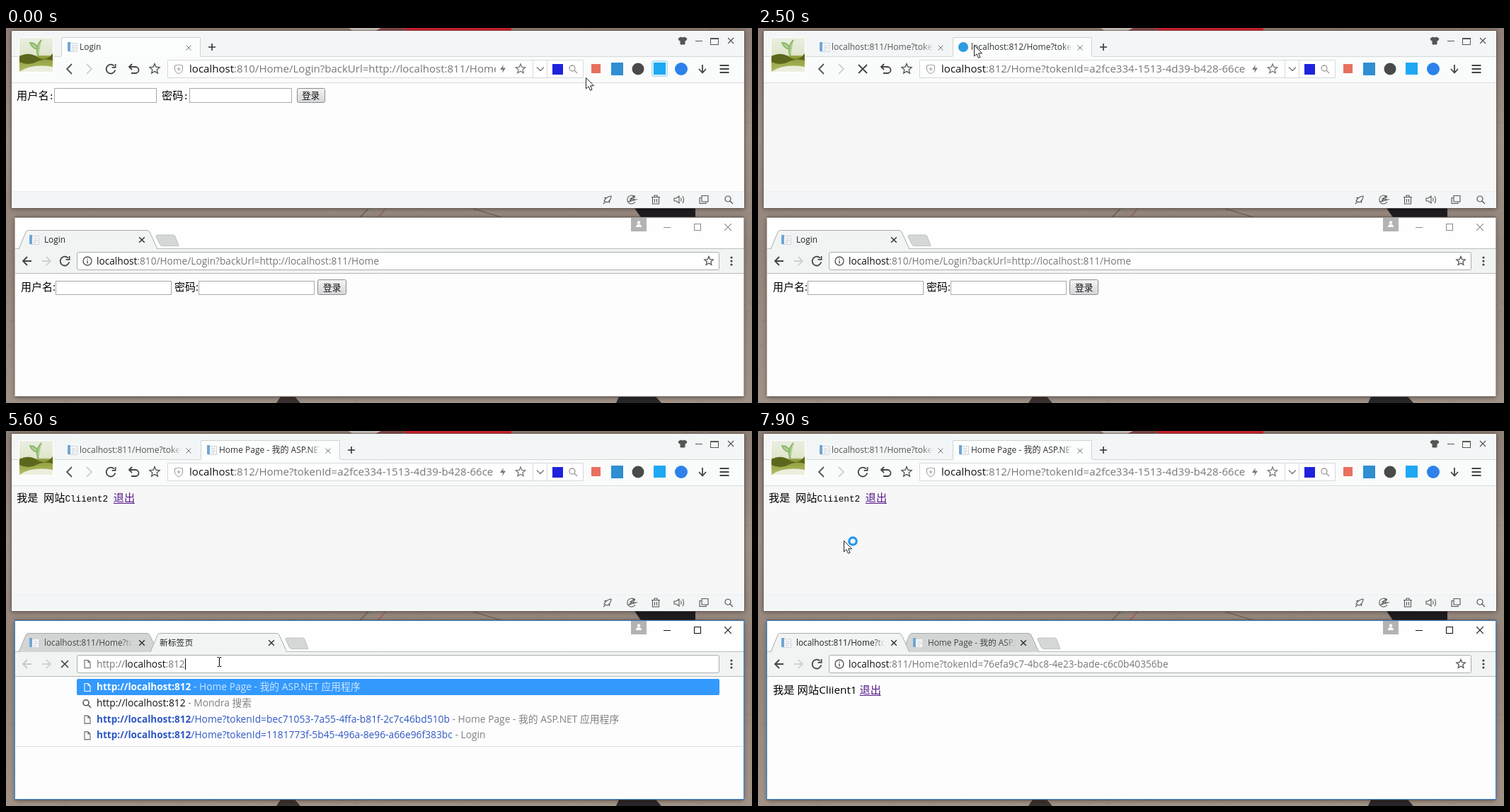
These frames come from a looping animation (1054x531 px, 8 s). An HTML page with a canvas:

```html
<!DOCTYPE html>
<html lang="zh-CN">
<head>
<meta charset="utf-8">
<title>Two browsers</title>
<style>
html, body { margin: 0; width: 100%; height: 100%; overflow: hidden; background: #998a80; }
canvas { display: block; width: 1054px; height: 531px; }
</style>
</head>
<body>
<canvas id="stage" width="1054" height="531"></canvas>
<script>
const ctx = document.getElementById('stage').getContext('2d');
const LOOP = 8000, STEP = 100;
const SANS = '"Open Sans", "Noto Sans CJK SC", "Noto Sans CJK JP", sans-serif';
const MONO = '"Liberation Mono", "Noto Sans CJK SC", monospace';
const TOKEN_A = '/Home?tokenId=a2fce334-1513-4d39-b428-66ce';
const TOKEN_B = '/Home?tokenId=76efa9c7-4bc8-4e23-bade-c6c0b40356be';
const LOGIN_PATH = '/Home/Login?backUrl=http://localhost:811/Home';
const HOME = 'Home Page - 我的 ASP.NET';
const BAR = '#f3f6f6', LINK = '#551a8b';

// ---------- helpers ----------
function rect(x, y, w, h, fill, stroke) {
  if (fill) { ctx.fillStyle = fill; ctx.fillRect(x, y, w, h); }
  if (stroke) { ctx.strokeStyle = stroke; ctx.lineWidth = 1; ctx.strokeRect(x + .5, y + .5, w - 1, h - 1); }
}
function round(x, y, w, h, r, fill, stroke) {
  const inset = stroke ? .5 : 0;
  ctx.beginPath();
  ctx.roundRect(x + inset, y + inset, w - 2 * inset, h - 2 * inset, r);
  if (fill) { ctx.fillStyle = fill; ctx.fill(); }
  if (stroke) { ctx.strokeStyle = stroke; ctx.lineWidth = 1; ctx.stroke(); }
}
function circle(x, y, r, fill) {
  ctx.beginPath(); ctx.arc(x, y, r, 0, 7); ctx.fillStyle = fill; ctx.fill();
}
function path(d, x, y, stroke, width = 1, fill) {
  const p = new Path2D(d);
  ctx.save();
  ctx.translate(x, y);
  if (fill) { ctx.fillStyle = fill; ctx.fill(p); }
  if (stroke) { ctx.strokeStyle = stroke; ctx.lineWidth = width; ctx.stroke(p); }
  ctx.restore();
}
function text(s, x, y, size, color, weight = 400) {
  ctx.font = `${weight} ${size}px ${SANS}`;
  ctx.fillStyle = color;
  ctx.fillText(s, x, y);
  return x + ctx.measureText(s).width;
}
function runs(parts, x, y, size) {
  for (const [s, color, weight] of parts) x = text(s, x, y, weight ? size * .985 : size, color, weight);
  return x;
}
function clipped(x, y, w, h, draw) {
  ctx.save();
  ctx.beginPath(); ctx.rect(x, y, w, h); ctx.clip();
  draw();
  ctx.restore();
}
function fadeText(s, x, y, w, size, color, bg) {
  clipped(x, y - 16, w, 24, () => text(s, x, y, size, color));
  const g = ctx.createLinearGradient(x + w - 16, 0, x + w, 0);
  g.addColorStop(0, bg + '00');
  g.addColorStop(1, bg);
  rect(x + w - 16, y - 12, 17, 16, g);
}
// full-width glyphs with half-width Latin
function songText(s, x, y, color = '#000') {
  const em = 15.2;
  for (const part of s.match(/[\x00-\x7f]+|[^\x00-\x7f]+/g)) {
    const latin = part.charCodeAt(0) < 128;
    ctx.font = `${latin ? em / 1.2 : em}px ${latin ? MONO : SANS}`;
    ctx.fillStyle = color;
    ctx.fillText(part, x, y);
    x += part.length * em * (latin ? .5 : 1);
  }
  return x;
}
function button(x, y, w, h, hot) {
  const g = ctx.createLinearGradient(0, y, 0, y + h);
  g.addColorStop(0, hot ? '#eaf6fd' : '#f4f4f4');
  g.addColorStop(1, hot ? '#b5def5' : '#d3d5d8');
  round(x, y, w, h, 2, g, hot ? '#3c7fb1' : '#8c8c8c');
}

// ---------- icons ----------
const cross = (x, y, r, c, w = 1) => path(`M${-r} ${-r}L${r} ${r}M${r} ${-r}L${-r} ${r}`, x, y, c, w);
const plus = (x, y) => path('M-5 0H5M0 -5V5', x, y, '#333', 1.6);
const star = (x, y, r, c) => {
  let d = '';
  for (let i = 0; i < 10; i++) {
    const a = i * Math.PI / 5 - Math.PI / 2, k = i % 2 ? r * .45 : r;
    d += (i ? 'L' : 'M') + Math.cos(a) * k + ' ' + Math.sin(a) * k;
  }
  path(d + 'Z', x, y, c, 1.3);
};
const reload = (x, y, c) => path('M4.6 -4.4A6.4 6.4 0 1 0 6.3 1.4M6.6 -7V-2.2H1.6', x, y, c, 1.8);
const lens = (x, y, c, w = 1.3) => path('M3 -1A4 4 0 1 1 -5 -1A4 4 0 1 1 3 -1M2 2L6 6', x, y, c, w);
const doc = (x, y, c = '#666') => path('M-4.5 -6H1.5L4.5 -3V6H-4.5ZM1.5 -6V-3H4.5', x, y, c, 1.1, '#fff');
const leaf = (x, y, c) => path('M-4 -5.5H1L4 -2.5V5.5H-4ZM1 -5.5V-2.5H4', x, y, c, 1.1);
const folder = (x, y) => path('M-6 -5H-1L1 -3H7V6H-6Z', x, y, '#e5b84e', 1, '#fbd774');
const shirt = (x, y, c, fill) => path('M-2.5 -5L-6 -3L-4.6 0L-3 -.8V5H3V-.8L4.6 0L6 -3L2.5 -5Q0 -3 -2.5 -5Z', x, y, c, 1, fill);
function favicon(x, y) {
  rect(x - 5, y - 6, 12, 13, '#f6f7f8', '#d2d7db');
  rect(x - 7, y - 7, 4, 13, '#6ea7d6');
  path('M-1 -2H4M-1 1H5M-1 4H3', x, y, '#c3ccd2');
}
function arrow(x, y, c, dir) {
  path(`M${-6 * dir} 0H${6 * dir}M0 -6L${6 * dir} 0L0 6`, x, y, c, 1.8);
}

// ---------- desktop ----------
function desktop() {
  const g = ctx.createLinearGradient(0, 0, 0, 531);
  g.addColorStop(0, '#8f8077'); g.addColorStop(.3, '#a19287');
  g.addColorStop(.6, '#94857b'); g.addColorStop(1, '#a29388');
  rect(0, 0, 1054, 531, g);
  let seed = 7;
  const rnd = () => (seed = seed * 16807 % 2147483647) / 2147483647;
  for (let i = 0; i < 1500; i++) {
    rect(rnd() * 1054, rnd() * 531, 1 + rnd() * 3, 1, rnd() < .5 ? 'rgba(60,45,38,.16)' : 'rgba(255,245,235,.12)');
  }
  path('M484 0H530L522 4H490Z', 0, 0, null, 1, '#cfc6c1');
  path('M530 0H566L562 4H522Z', 0, 0, null, 1, '#8a4a48');
  rect(564, 0, 150, 4, '#d5242f');
  path('M888 255H974V268H897Z', 0, 0, null, 1, '#1f1c20');
  path('M500 268L512 256M660 256L700 268', 0, 0, '#6b5b52', 1.2);
  path('M526 268L536 256', 0, 0, '#a0605a', 1.5);
  path('M382 531L388 522H408L416 531Z', 0, 0, null, 1, '#3b3330');
  path('M866 522H918L926 531H862Z', 0, 0, null, 1, '#2a272b');
}
function windowBox(x, y, w, h) {
  ctx.save();
  ctx.shadowColor = 'rgba(0,0,0,.45)';
  ctx.shadowBlur = 7;
  ctx.shadowOffsetY = 1;
  rect(x, y, w, h, '#fdfdfd');
  ctx.restore();
  rect(x - 1, y - 1, w + 2, h + 2, null, 'rgba(90,80,74,.55)');
}

// ---------- upper browser ----------
function avatar() {
  const g = ctx.createLinearGradient(0, 14, 0, 62);
  g.addColorStop(0, '#e9eee0'); g.addColorStop(.5, '#dfe6cc');
  g.addColorStop(.55, '#8d9a35'); g.addColorStop(1, '#b3bd6a');
  rect(18, 13, 49, 50, '#fff');
  rect(19, 14, 47, 48, g);
  path('M19 40Q32 33 44 41T66 36V46Q54 42 43 48T19 48Z', 0, 0, null, 1, '#5c661c');
  path('M46 40Q40 28 50 17M45 30Q37 29 34 21Q43 21 45 30', 0, 0, '#8fb86c', 2, '#b4d095');
  path('M19 62Q36 50 66 55V62Z', 0, 0, null, 1, '#eceedd');
}

function upperTab(x, active, title, icon) {
  const bg = active ? '#fcfdfd' : BAR;
  if (active) {
    rect(x, 13, 197, 28, bg);
    path(`M${x + .5} 40V13.5H${x + 196.5}V40`, 0, 0, '#cfd3d4');
  }
  if (icon === 'load') circle(x + 15, 27, 7, '#2f9be0');
  else if (icon === 'doc') doc(x + 15, 27, '#888');
  else favicon(x + 16, 27);
  fadeText(title, x + 26, 31, 144, 12, active ? '#333' : '#555', bg);
  cross(x + 180, 28, 3.5, '#777');
}

function newTabPage() {
  rect(8, 78, 1035, 35, '#f8f9f9');
  rect(8, 113, 1035, 119, '#ececec');
  path('M8 112.5H1043', 0, 0, '#dedede');
  const mark = (s, x) => text(s, x, 99.5, 11.4, '#444');
  round(19, 89, 10, 14, 2, '#3f97e0', '#2c7ac0');
  rect(21, 91, 6, 8, '#e6f3fd');
  mark('手机收藏夹', 36);
  doc(112, 96, '#888');
  mark('已安装扩展', 124);
  [[194, '工作'], [255, '学习'], [316, '文档'], [377, '资料'], [438, '前端'], [499, '数据'], [560, '设计'],
   [621, '测试'], [696, '开发'], [750, '工具'], [805, '收藏一些问题'], [965, '其它收藏']].forEach(([x, s]) => {
    folder(x + 6, 96);
    mark(s, x + 19);
  });
  text('»', 944, 100, 14, '#333');
  rect(290, 165, 370, 33, '#f7f7f7', '#d8d8d8');
  round(660, 165, 100, 33, 2, '#a9cdf4');
  text('搜索一下', 686, 187, 14, '#fff');
  path('M980 148L1012 175L980 203', 0, 0, '#cfcfcf', 4);
  path('M980 148L1012 175L980 203', 0, 0, '#fafafa', 2);
  shirt(984, 141, '#999', '#f4f4f4');
  circle(1011, 141, 6, '#aaa'); circle(1011, 141, 5, '#ececec');
  for (let i = 0; i < 8; i++) {
    const a = i * Math.PI / 4;
    path(`M${Math.cos(a) * 5.5} ${Math.sin(a) * 5.5}L${Math.cos(a) * 8} ${Math.sin(a) * 8}`, 1011, 141, '#aaa', 2);
  }
  circle(1011, 141, 2, '#aaa');
  round(1030, 114, 10, 42, 5, '#a5a7ab');
}

function upperList() {
  ctx.save();
  ctx.shadowColor = 'rgba(0,0,0,.4)'; ctx.shadowBlur = 14; ctx.shadowOffsetY = 4;
  rect(229, 71, 494, 153, '#fff');
  ctx.restore();
  rect(229, 71, 494, 153, '#fff', '#b9bcc0');
  rect(230, 72, 492, 30, '#5b9ff5');
  const rows = [['', HOME + ' ...'], ['/Home', 'Login'], ['/Home...', 'Login'], ['/Home...', HOME + ' ...'], ['', '寻岚']];
  rows.forEach(([tail, title], i) => {
    const y = 91 + i * 30.3, top = i === 0;
    if (i < 4) favicon(243, y - 4); else lens(242, y - 3, '#666', 1.8);
    runs([['http://localhost:812', top ? '#fff' : '#5091ee', 700], [tail, '#555']], 257, y, 13.8);
    text(title, 450, y, 13.8, top ? '#fff' : '#555');
  });
}

function upper(t) {
  const tabs = t >= 1400 ? 2 : 1;
  const blank = t >= 1400 && t < 2200;
  const loading = (t >= 500 && t < 800) || (t >= 2200 && t < 2700);
  const grey = '#555', pale = '#cfd2d3';
  windowBox(8, 4, 1035, 251);
  rect(8, 4, 1035, 73, BAR);
  path('M8 40.5H1043', 0, 0, '#d5d9da');
  rect(8, 41, 1035, 36, '#fafcfc');
  path('M8 77.5H1043', 0, 0, '#d9dcdd');
  avatar();

  const first = t < 500 ? 'Login' : 'localhost:811/Home?tokenId=a2fce334';
  upperTab(78, tabs === 1, first, t >= 500 && t < 800 ? 'load' : 'page');
  if (tabs === 2) {
    const title = blank ? '新标签页' : t < 2700 ? 'localhost:812/Home?tokenId=a2fce334' : HOME + ' 应用程序';
    upperTab(275, true, title, blank ? 'doc' : t < 2700 ? 'load' : 'page');
  }
  plus(tabs === 2 ? 488 : 291, 27);
  shirt(956, 18, '#555', '#555');
  path('M974 18.5H984', 0, 0, grey);
  rect(995, 14, 12, 10, null, grey);
  rect(995, 14, 12, 2, grey);
  cross(1024, 18, 4, grey, 1.2);

  path('M3 -7L-4 0L3 7', 90, 58, blank ? pale : grey, 1.8);
  path('M-3 -7L4 0L-3 7', 117, 58, pale, 1.8);
  if (loading) cross(148, 58, 6, '#444', 1.8); else reload(148, 58, '#444');
  path('M-6 -3H3A4.5 4.5 0 0 1 3 6H-3M-2 -7L-6 -3L-2 1', 180, 58, '#444', 1.8);
  star(210, 58, 7.5, '#555');

  rect(228, 45, 588, 26, '#fff', '#d6dadc');
  path('M744.5 46V70M764.5 46V70', 0, 0, '#d6dadc');
  path('M-5.5 -5Q0 -5 0 -6.5Q0 -5 5.5 -5V1Q4.5 5 0 7Q-4.5 5 -5.5 1ZM-2.5 0H2.5M0 -2.5V2.5', 244, 58, '#999');
  if (blank) {
    const full = 'http://localhost:812';
    const s = full.slice(0, t < 1500 ? 0 : t < 1800 ? 17 + (t - 1500) / 100 : 20);
    const x = runs([[s.slice(0, 7), '#777'], [s.slice(7, 16), '#111'], [s.slice(16), '#777']], 259, 63, 15.05);
    rect(Math.round(x), 50, 1, 16, '#000');
    path('M724.5 46V70', 0, 0, '#d6dadc');
    path('M-5 -2.5L0 2.5L5 -2.5', 735, 58, '#777', 1.3);
    path('M-2.5 -5L2.5 0L-2.5 5', 756, 58, '#777', 1.3);
  } else {
    const rest = t < 500 ? ':810' + LOGIN_PATH : (t < 1400 ? ':811' : ':812') + TOKEN_A;
    clipped(250, 46, 442, 24, () => runs([['localhost', '#111'], [rest, '#777']], 259, 63, 15.05));
    path('M1 -6L-4 1H0L-1 6L4 -1.5H0Z', 702, 58, null, 1, '#777');
    star(727, 58, 7, '#777');
    path('M-5 -2.5L0 2.5L5 -2.5', 755, 58, '#777', 1.3);
  }
  rect(772, 51, 15, 15, '#1f22dc');
  lens(801, 58, '#999');
  if (t < 100) round(912, 46, 23, 23, 2, '#d7effc', '#a9d9f5');
  rect(827, 51, 13, 13, '#e8705f');
  rect(855, 49, 17, 18, '#2f8fd2');
  circle(893, 58, 8.5, '#4a4a4a');
  rect(915, 49, 17, 17, '#1fa8f3');
  circle(954, 58, 9, '#2c82ea');
  path('M0 -6V5M-5 0L0 5.5L5 0', 984, 58, '#444', 1.8);
  path('M-6.5 -5H6.5M-6.5 0H6.5M-6.5 5H6.5', 1015, 58, '#444', 1.8);

  rect(8, 78, 1035, 154, t < 2200 ? '#fdfdfd' : '#f7f7f7');
  if (t < 500) {
    songText('用户名:', 15, 101);
    rect(68, 85, 145, 21, '#fff', '#a9a9a9');
    songText('密码:', 220, 101);
    rect(259, 85, 145, 21, '#fff', '#a9a9a9');
    button(411, 85, 40, 21, t >= 300);
    text('登录', 418, 100, 12.6, '#111');
  } else if (blank) {
    newTabPage();
  } else if (!loading) {
    const x = songText(`我是 网站Cliient${t < 1400 ? 1 : 2} `, 15, 100);
    songText('退出', x, 100, LINK);
    rect(x, 102, 30, 1, LINK);
  }

  rect(8, 231, 1035, 24, BAR);
  path('M8 231.5H1043', 0, 0, '#eceff0');
  const low = (d, x) => path(d, x, 243, '#555', 1.1);
  low('M-5 2Q-2 -4 5 -5Q5 1 -1 4ZM-5 -2L-2 -3M2 5L3 2M-6 6L-3 3', 850);
  low('M5 -3A6 6 0 1 0 5 3M-4 3L1 -1H-2L4 -5L2 0H6Z', 884);
  low('M-6 -3.5H6M-2 -3.5V-6H2V-3.5M-4.5 -3.5V6H4.5V-3.5M-1.5 -1V4M1.5 -1V4', 918);
  low('M-7 -2H-4L0 -5V5L-4 2H-7ZM2.5 -2.5Q4 0 2.5 2.5M5 -5Q8 0 5 5', 951);
  low('M-3 -5.5H6V3H-3ZM-3 -2.5H-6V5.5H3V3', 986);
  lens(1021, 243, '#555', 1.2);
  if (t >= 1500 && t < 2200) upperList();
}

// ---------- lower browser ----------
function lowerTab(x, right, active, title, icon) {
  const bg = active ? '#f2f4f4' : '#d3d5d5';
  path(`M${x} 313L${x + 10} 289Q${x + 11} 286.5 ${x + 14} 286.5H${right - 15}Q${right - 12} 286.5 ${right - 11} 289L${right} 313`,
    0, 0, '#a8acac', 1, bg);
  const cx = x + 22;
  if (icon === 'page') favicon(cx, 300);
  if (icon === 'doc') doc(cx, 300, '#444');
  if (icon === 'spin') path('M-5 0A6 6 0 0 1 0 -5', cx - 4, 300, '#888', 2);
  fadeText(title, x + (icon ? 36 : 13), 304, icon ? 125 : 146, 11.8, active ? '#222' : '#444', bg);
  cross(right - 22, 300, 3.8, '#333', 1.5);
}

function lowerList() {
  rect(14, 348, 1027, 99, '#fdfdfd');
  path('M14 446.5H1041', 0, 0, '#dcdcdc');
  round(100, 351, 908, 23, 2, '#3399fd');
  const host = 'http://localhost:812', blue = '#2f58c4', grey = '#808080', tail = ' - ' + HOME + ' 应用程序';
  const rows = [
    [[host, '#fff', 700], [tail, '#cfe6ff']],
    [[host, '#111'], [' - Mondra 搜索', grey]],
    [[host, blue, 700], ['/Home?tokenId=bec71053-7a55-4ffa-b81f-2c7c46bd510b', blue], [tail, grey]],
    [[host, blue, 700], ['/Home?tokenId=1181773f-5b45-496a-8e96-a66e96f383bc', blue], [' - Login', grey]]
  ];
  rows.forEach((parts, i) => {
    const y = 367 + i * 22.8;
    if (i === 1) lens(114, y - 4, '#555', 1.6);
    else leaf(115, y - 4, i ? '#666' : '#fff');
    runs(parts, 128, y, 13.8);
  });
}

function lower(t) {
  const focus = t >= 3900, logged = t >= 4200;
  const two = t >= 5100, second = two && t < 7400;
  const typing = t >= 5600 && t < 6000;
  const fresh = second && t < 5600;
  const loading = second && t >= 5600 && t < 6700;
  const ctl = focus ? '#111' : '#8a8a8a';
  windowBox(13, 268, 1029, 254);
  rect(13, 268, 1029, 45, '#fefefe');
  rect(883, 269, 22, 19, '#b3b3b3');
  circle(894, 275.5, 2.2, '#fff');
  path('M-4 4Q-4 0 0 0Q4 0 4 4Z', 894, 278, null, 1, '#fff');
  path('M929 282.5H939', 0, 0, ctl);
  rect(972, 277, 10, 10, null, ctl);
  cross(1020, 282, 4.8, ctl, 1.1);
  rect(13, 313, 1029, 35, '#f2f4f4');
  path('M13 312.5H1042', 0, 0, '#b9bdbd');

  const tabA = () => lowerTab(18, 214, !second, logged ? 'localhost:811/Home?tokenId=76efa9c7' : 'Login',
    logged && t < 4700 ? 'doc' : 'page');
  const tabB = () => lowerTab(204, 397, second, t < 6000 ? '新标签页' : t < 6700 ? '正在加载...' : HOME + ' 应用程序',
    t < 6000 ? '' : t < 6700 ? 'spin' : 'page');
  if (two) second ? (tabA(), tabB()) : (tabB(), tabA());
  else tabA();
  const nx = two ? 183 : 0;
  path('M215 293H236Q238 293 239 295L244 308.5H221Q218 308.5 217 306L212 295Q211 293 215 293Z', nx, 0, '#bfc3c3', 1, '#d5d7d7');

  arrow(30, 330, second ? '#c6c9c9' : '#444', -1);
  arrow(57, 330, '#cfd2d2', 1);
  if (loading) cross(83, 330, 5, '#444', 1.7); else reload(83, 330, '#444');
  round(100, 317, 908, 26, 2, '#fff', '#a9adad');
  for (const y of [325, 330, 335]) circle(1025, y, 1.6, '#444');

  if (typing || fresh) {
    if (typing) leaf(115, 330, '#666');
    else lens(114, 330, '#666', 1.5);
    const x = typing ? runs([['http://', '#777'], ['localhost', '#111'], [':812', '#777']], 128, 335, 13.7) : 128;
    rect(Math.round(x), 322, 1, 16, '#000');
  } else {
    path('M6 0A6 6 0 1 1 -6 0A6 6 0 1 1 6 0M0 -3.5V-2M0 -.8V3.5', 115, 330, '#555', 1.4);
    const rest = !logged ? ':810' + LOGIN_PATH : !second ? ':811' + TOKEN_B : t < 6500 ? ':812' : ':812' + TOKEN_B;
    runs([['localhost', '#111'], [rest, '#777']], 128, 335, 13.7);
    star(993, 330, 6.5, '#555');
  }

  rect(13, 347, 1029, 175, '#fdfdfd');
  path('M13 347.5H1042', 0, 0, '#b6baba');
  if (!logged) {
    text('用户名:', 21, 372, 15, '#000');
    rect(70, 358, 164, 20, '#fff', '#a9a9a9');
    text('密码:', 238, 372, 15, '#000');
    rect(272, 358, 164, 20, '#fff', '#a9a9a9');
    button(440, 356, 41, 22, t >= 4000);
    text('登录', 448, 372, 12.7, '#111');
  } else if (!second || t >= 6700) {
    const x = text(`我是 网站Cliient${second ? 2 : 1} `, 21, 372, 15.3, '#000');
    text('退出', x, 372, 15.3, LINK);
    rect(x, 374, 30, 1, LINK);
  }
  if (typing) lowerList();
  if (second && t >= 6000 && t < 6700) {
    round(13, 501, 342, 21, 2, '#f1f2f2', '#cdd0d0');
    text('正在建立安全连接...', 16, 516, 11.2, '#666');
  }
  rect(12, 268, 1031, 254, null, focus ? '#3b8ad8' : '#b0aca8');
}

// ---------- pointer ----------
const KEYS = [[0, 819, 70], [100, 690, 82], [200, 520, 92], [300, 432, 93], [800, 432, 93], [1300, 292, 24],
  [1400, 292, 24], [1500, 305, 24], [2500, 305, 24], [2800, 330, 4], [2900, 330, 4], [3200, 250, 388],
  [3400, 220, 492], [3600, 132, 511], [3800, 61, 470], [4100, 447, 366], [4300, 458, 371], [4600, 458, 371],
  [4700, 455, 366], [5000, 228, 300], [5100, 228, 300], [5300, 301, 327], [6600, 301, 327], [7300, 93, 308],
  [7500, 93, 308], [7600, 108, 302], [7800, 108, 302], [7900, 121, 155], [8000, 121, 155]];

function pointer(t) {
  const i = KEYS.findIndex(k => k[0] > t);
  const [t0, x0, y0] = KEYS[i - 1], [t1, x1, y1] = KEYS[i];
  const k = (t - t0) / (t1 - t0);
  const x = Math.round(x0 + (x1 - x0) * k), y = Math.round(y0 + (y1 - y0) * k);
  if (t >= 5300 && t < 6700) {
    path('M-3 -6.5H-.5M.5 -6.5H3M0 -6V6M-3 6.5H-.5M.5 6.5H3', x + .5, y, '#111', 1.2);
    return;
  }
  path('M.5 .5V16L4 12.8L6.5 18.3L9 17.2L6.6 11.8H11.5Z', x, y, '#222', 1, '#fff');
  if (t >= 7600) {
    ctx.beginPath();
    ctx.arc(x + 13, y + 1, 5.2, 0, 7);
    ctx.fillStyle = '#e9f5fe'; ctx.fill();
    ctx.strokeStyle = '#2495ec'; ctx.lineWidth = 3.2; ctx.stroke();
  }
}

let last = -1;
function frame() {
  const t = Math.floor(performance.now() % LOOP / STEP) * STEP;
  if (t !== last) {
    last = t;
    desktop();
    upper(t);
    lower(t);
    pointer(t);
  }
  requestAnimationFrame(frame);
}
frame();
</script>
</body>
</html>
```
